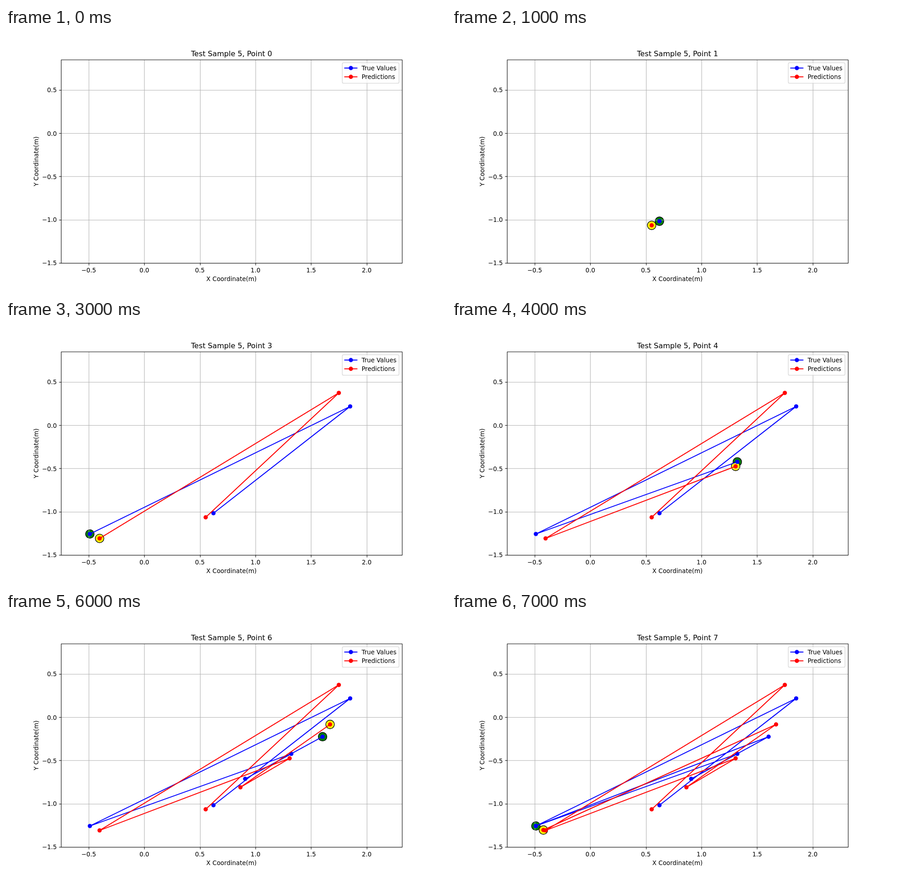
Animation of 966x580 px, one loop 8 s. Source, as an HTML page with a canvas:

```html
<!DOCTYPE html>
<html lang="en">
<head>
<meta charset="utf-8">
<title>Predicted and true points</title>
<style>
html, body { margin: 0; width: 100%; height: 100%; overflow: hidden; background: #fff; }
canvas { display: block; }
</style>
</head>
<body>
<canvas id="stage" width="966" height="580"></canvas>
<script>
const ctx = document.getElementById('stage').getContext('2d');
const STEP = 1000, STEPS = 8;

// The figure is laid out on 1000 x 600 units at 100 dpi and scaled to the stage
const WIDTH = 1000, HEIGHT = 600;
const pt = n => n * 100 / 72;
const snap = v => Math.round(v) + 0.5;
const LEFT = snap(125), RIGHT = snap(900), TOP = snap(72), BOTTOM = snap(534);
const HAIR = pt(0.8), LINE = pt(1.5);

// Points in the order they appear
const series = [
  { name: 'True Values', color: '#0000ff', halo: '#008000', legendY: 91,
    points: [[471.5, 439.1], [782.2, 196.4], [190.6, 486.3], [648.4, 322.4],
             [543.6, 379.2], [719.5, 283.4], [190.6, 486.3]] },
  { name: 'Predictions', color: '#ff0000', halo: '#ffff00', legendY: 111,
    points: [[453.8, 448.5], [756.4, 165.7], [212.7, 496.4], [644.6, 332.6],
             [532.8, 398.4], [736.5, 255.5], [207.7, 495.5]] }
];

const mapX = v => 314.35 + v * 252.7;
const mapY = v => 72 + (0.85 - v) / 2.35 * 462;
const label = v => v.toFixed(1).replace('-', '\u2212');
const xTicks = [-0.5, 0, 0.5, 1, 1.5, 2];
const yTicks = [0.5, 0, -0.5, -1, -1.5];

function path(points, color, width) {
  ctx.beginPath();
  for (const [x, y] of points) ctx.lineTo(x, y);
  ctx.strokeStyle = color;
  ctx.lineWidth = width;
  ctx.stroke();
}

function dot([x, y], radius, fill, edge, width) {
  ctx.beginPath();
  ctx.arc(x, y, radius, 0, Math.PI * 2);
  ctx.fillStyle = fill;
  ctx.fill();
  ctx.strokeStyle = edge;
  ctx.lineWidth = width;
  ctx.stroke();
}

function text(str, x, y, align = 'center', size = 10) {
  ctx.font = `${pt(size)}px "DejaVu Sans", sans-serif`;
  ctx.textAlign = align;
  ctx.fillStyle = '#000';
  ctx.fillText(str, x, y);
}

const marker = (p, color) => dot(p, pt(3), color, color, pt(1));

function drawGrid() {
  for (const x of xTicks.map(mapX).map(snap)) path([[x, TOP], [x, BOTTOM]], '#b0b0b0', HAIR);
  for (const y of yTicks.map(mapY).map(snap)) path([[LEFT, y], [RIGHT, y]], '#b0b0b0', HAIR);
}

function drawAxes() {
  for (const v of xTicks) {
    const x = mapX(v);
    path([[snap(x), BOTTOM], [snap(x), BOTTOM + pt(3.5)]], '#000', HAIR);
    text(label(v), x, 555);
  }
  for (const v of yTicks) {
    const y = mapY(v);
    path([[LEFT, snap(y)], [LEFT - pt(3.5), snap(y)]], '#000', HAIR);
    text(label(v), 115.5, Math.round(y + 5.4), 'right');
  }
  ctx.strokeStyle = '#000';
  ctx.lineWidth = HAIR;
  ctx.strokeRect(LEFT, TOP, RIGHT - LEFT, BOTTOM - TOP);
  text('X Coordinate(m)', 512.5, 575);
  ctx.save();
  ctx.translate(74, 303);
  ctx.rotate(-Math.PI / 2);
  text('Y Coordinate(m)', 0, 0);
  ctx.restore();
}

function drawLegend() {
  ctx.beginPath();
  ctx.roundRect(764.3, 79, 128.8, 46.6, pt(2));
  ctx.fillStyle = 'rgba(255,255,255,0.8)';
  ctx.fill();
  ctx.strokeStyle = 'rgba(204,204,204,0.8)';
  ctx.lineWidth = pt(1);
  ctx.stroke();
  for (const { name, color, legendY } of series) {
    path([[768.8, legendY], [798.7, legendY]], color, LINE);
    marker([783.8, legendY], color);
    text(name, 808.2, legendY + 5, 'left');
  }
}

function draw(count) {
  ctx.setTransform(966 / WIDTH, 0, 0, 580 / HEIGHT, 0, 0);
  ctx.fillStyle = '#fff';
  ctx.fillRect(0, 0, WIDTH, HEIGHT);
  ctx.lineJoin = 'round';
  if (count) {
    for (const s of series) dot(s.points[count - 1], pt(Math.sqrt(200) / 2), s.halo, '#000', pt(1));
  }
  drawGrid();
  for (const s of series) {
    const shown = s.points.slice(0, count);
    path(shown, s.color, LINE);
    for (const p of shown) marker(p, s.color);
  }
  drawAxes();
  text(`Test Sample 5, Point ${count}`, 512.7, 64, 'center', 12);
  drawLegend();
}

const start = performance.now();
function tick() {
  const elapsed = Math.max(0, performance.now() - start);
  draw(Math.floor(elapsed / STEP) % STEPS);
  requestAnimationFrame(tick);
}
tick();
</script>
</body>
</html>
```
